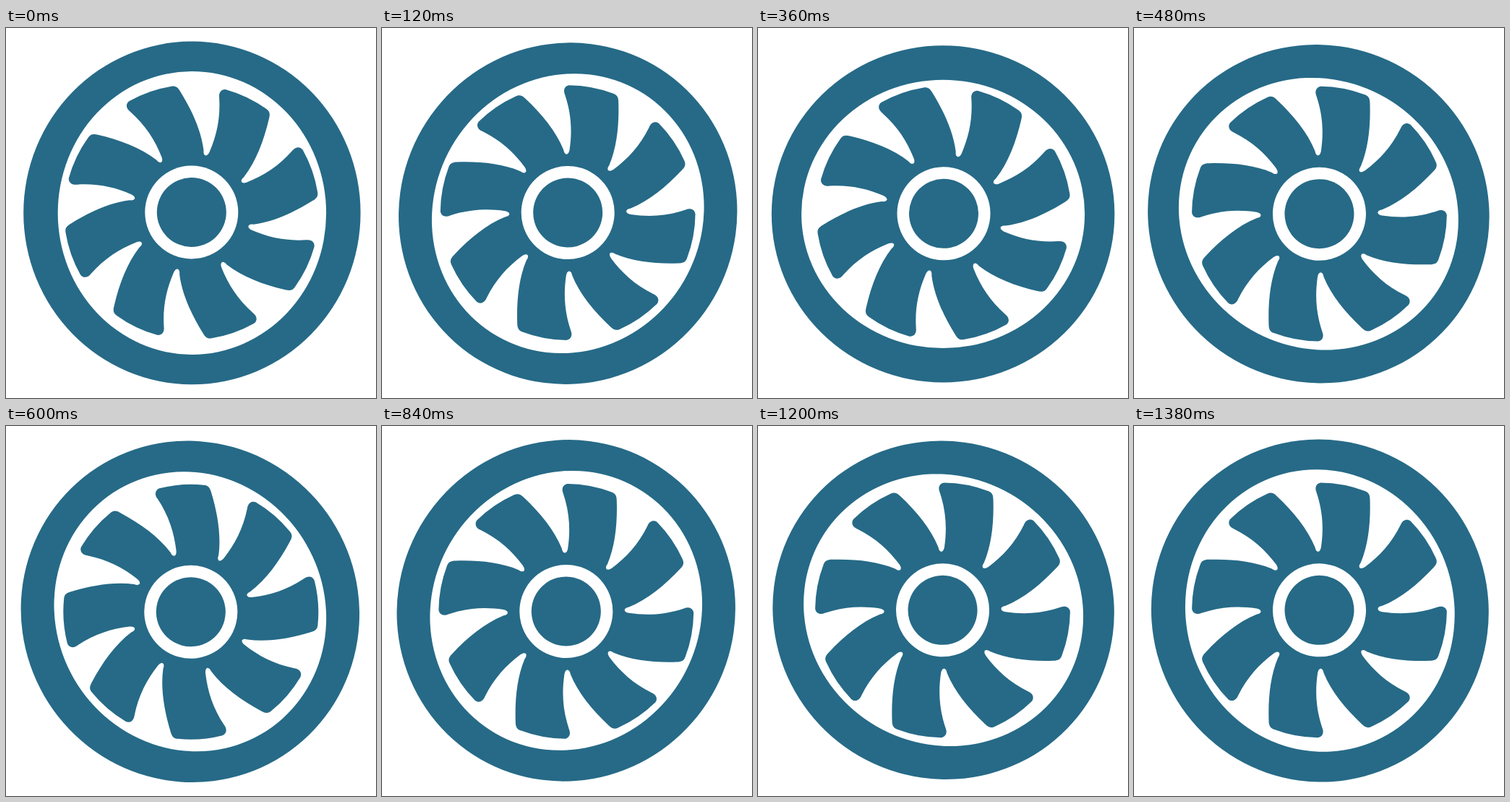
An HTML page for the animation above (1440 ms loop, 512 by 512 pixels).

```html
<!DOCTYPE html>
<html lang="en">
<head>
<meta charset="utf-8">
<title>Spinning fan</title>
<style>
  html, body { margin: 0; width: 100%; height: 100%; overflow: hidden; background: #fff; }
  svg { display: block; width: 100%; height: 100%; fill: #266a87; }
  .gap { fill: #fff; }
</style>
</head>
<body>
<svg viewBox="-256 -256 512 512">
  <defs>
    <path id="blade" d="M0 0L-1.8-81Q1.2-81 2.4-87C6-112 5-136-4-163C-7-170-4-175.7 2-176.4
      A176.5 176.5 0 0 1 63-164.9C68-163 70-160 70-153C71-122 68-91 57.3-65.8Q53.7-60.8 56-58.5Z"/>
  </defs>
  <g id="fan">
    <ellipse cx="1.4" cy="-.1" rx="233.2" ry="237.3"/>
    <ellipse class="gap" cx="1.4" cy="-.1" rx="185.7" ry="196"/>
    <g transform="translate(.8 -1)">
      <g id="blades" transform="rotate(15)"></g>
      <circle r="80"/>
      <circle class="gap" r="64.5"/>
      <circle r="48"/>
    </g>
  </g>
</svg>
<script>
  const LOOP = 1440, STEP = 60;
  const fan = document.getElementById('fan');

  document.getElementById('blades').innerHTML = Array.from({ length: 8 },
    (_, i) => `<use href="#blade" transform="rotate(${i * 45})"/>`).join('');

  // One clockwise turn per loop, advancing in discrete steps.
  function draw() {
    const step = Math.floor((performance.now() % LOOP) / STEP);
    fan.setAttribute('transform', `rotate(${step * STEP / LOOP * 360})`);
    requestAnimationFrame(draw);
  }
  draw();
</script>
</body>
</html>
```
